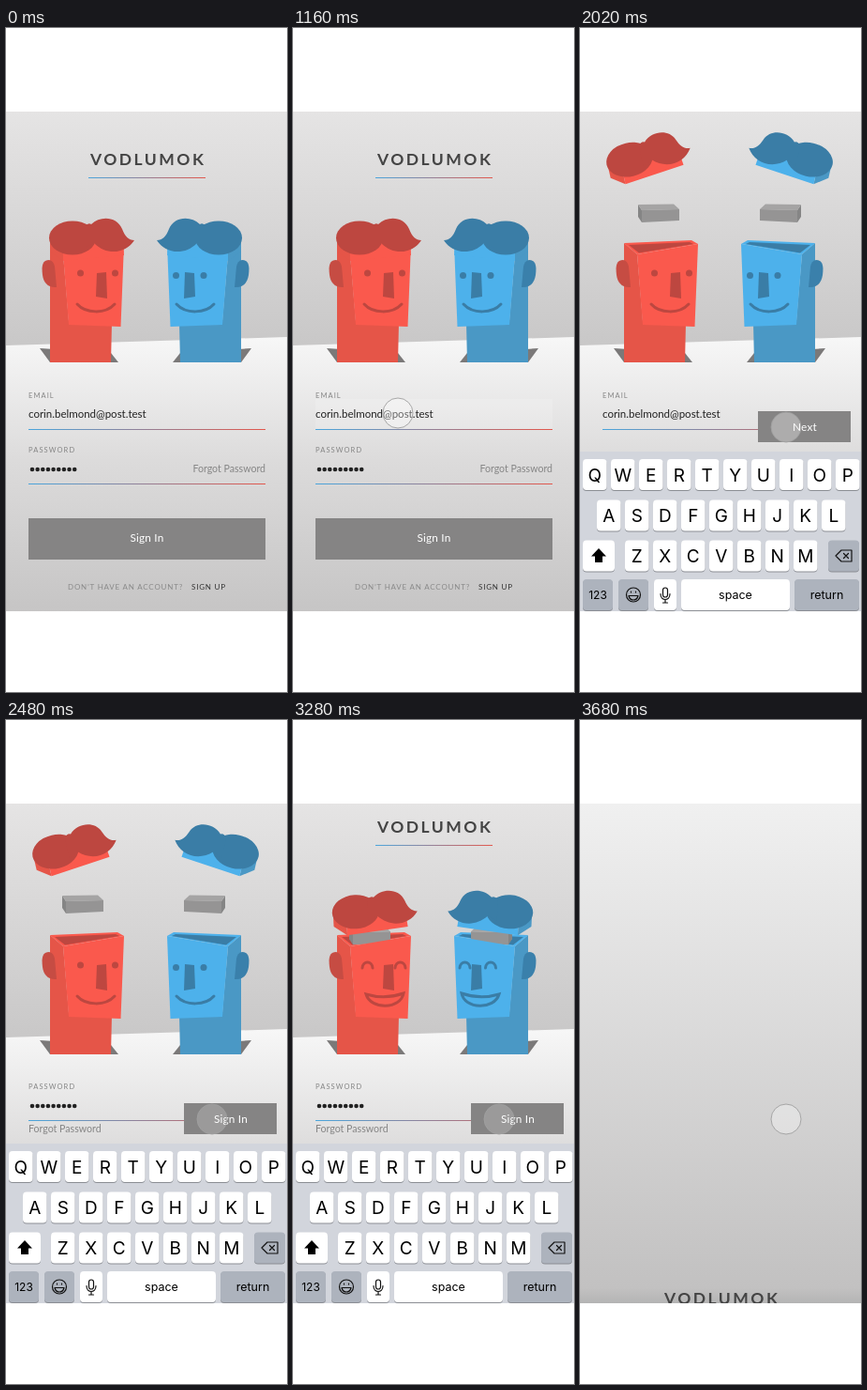
Animation of 300x707 px, one loop 3.7 s. Source, as an HTML page:

```html
<!DOCTYPE html>
<html lang="en">
<head>
<meta charset="utf-8">
<style>
html, body { margin: 0; width: 100%; height: 100%; overflow: hidden; background: #fff; }
svg { display: block; width: 300px; height: 707px; font-family: Lato, sans-serif; }
.label { font-size: 7.5px; letter-spacing: 1.1px; fill: #858585; }
.small { font-size: 8px; letter-spacing: .8px; fill: #8a8a8a; }
.forgot { font-size: 10.6px; fill: #858585; }
.button { font-size: 11.8px; letter-spacing: .2px; fill: #fff; text-anchor: middle; }
.title { font-size: 17.5px; font-weight: 700; letter-spacing: 2.5px; fill: #444; text-anchor: middle; }
#keys { font-family: Inter, sans-serif; text-anchor: middle; }
</style>
</head>
<body>
<svg viewBox="0 0 300 707">
  <defs>
    <linearGradient id="wall" gradientUnits="userSpaceOnUse" x1="0" y1="89" x2="0" y2="335">
      <stop stop-color="#e5e4e4"/><stop offset="1" stop-color="#c9c8c8"/>
    </linearGradient>
    <linearGradient id="sky" x2="0" y2="1">
      <stop stop-color="#f0f0f0"/><stop offset=".97" stop-color="#c2c1c1"/><stop offset="1" stop-color="#b4b4b4"/>
    </linearGradient>
    <linearGradient id="floor" x2="0" y2="1">
      <stop stop-color="#f7f7f7"/><stop offset=".45" stop-color="#dcdbdb"/><stop offset="1" stop-color="#c6c5c5"/>
    </linearGradient>
    <linearGradient id="rule"><stop stop-color="#4aa5dc"/><stop offset="1" stop-color="#e2574c"/></linearGradient>
  </defs>
  <path d="M0 89H300V621H0Z" fill="url(#wall)"/>
  <path id="blank" d="M0 89H300V621H0Z" fill="url(#sky)"/>
  <g id="scene">
    <path d="M0 338L300 329V621H0Z" fill="url(#floor)"/>
    <g id="heads"></g>
    <g id="title">
      <text class="title" x="151.7" y="146">VODLUMOK</text>
      <rect x="88" y="159" width="125" height="1" fill="url(#rule)"/>
    </g>
    <g id="email">
      <rect id="glow" x="24" y="395" width="253" height="32" fill="#fff"/>
      <text class="label" x="24" y="394">EMAIL</text>
      <text x="24" y="415" font-size="11.5" fill="#222">corin.belmond@post.test</text>
      <rect x="24" y="427" width="253" height="1" fill="url(#rule)"/>
    </g>
    <g id="password">
      <text class="label" x="24" y="452">PASSWORD</text>
      <g id="dots" fill="#222"></g>
      <rect x="24" y="485" width="253" height="1" fill="url(#rule)"/>
    </g>
    <g id="signin">
      <text class="forgot" x="277" y="473" text-anchor="end">Forgot Password</text>
      <path d="M24 522H277V566H24Z" fill="#858484"/>
      <text class="button" x="150.5" y="547">Sign In</text>
      <text class="small" x="66" y="598">DON’T HAVE AN ACCOUNT?</text>
      <text class="small" x="198" y="598" style="fill:#333">SIGN UP</text>
    </g>
    <text id="forgot" class="forgot" x="24" y="439">Forgot Password</text>
    <g id="action">
      <path d="M190 408H289V441H190Z" fill="#858484"/>
      <text id="next" class="button" x="240" y="429">Next</text>
      <text id="submit" class="button" x="240" y="429">Sign In</text>
    </g>
    <g id="keys"></g>
  </g>
  <path d="M0 0H300V89H0ZM0 621H300V707H0Z" fill="#fff"/>
  <circle id="touch" r="16" fill="#fff" stroke="#a0a0a0" stroke-opacity=".9"/>
</svg>
<script>
const $ = id => document.getElementById(id);
const all = name => document.querySelectorAll('.' + name);

// Heads: the right one mirrors the left one.
function head(front, side, dark, ear, eye, eyeY, mirror) {
  const poly = (points, fill) => `<polygon points="${points}" fill="${fill}"/>`;
  const line = d => `<path d="${d}" fill="none" stroke="${dark}" stroke-width="3" stroke-linecap="round"/>`;
  const arc = x => line(`M${x - 5.5} 264C${x - 5} 256 ${x + 5} 256 ${x + 5.5} 264`);
  return `<g ${mirror ? 'transform="translate(298) scale(-1 1)"' : ''}>
    ${poly('36,341 112,346 120,356 47,356', '#7b7979')}
    ${poly('47,229 61,241 67,312 113,314 112,356 47,356', side)}
    ${poly('47,229 119,226 126,230 61,241', front)}
    ${poly('52,231 117,228 121,230 63,239.5', dark)}
    <g class="block" data-side="${mirror ? -1 : 1}">
      ${poly('62,188 66,194 66,207 62,201', '#858585')}
      ${poly('62,188 100,187.5 106,193 66,194', '#a5a4a4')}
      ${poly('66,194 106,193 106,205 66,207', '#959494')}
    </g>
    ${poly('61,241 126,230 122.5,318 67,316', front)}
    ${poly('97,261 107,260 108,288 96,286', dark)}
    <g class="calm">
      <circle cx="${eye}" cy="${eyeY}" r="3.5" fill="${dark}"/>
      <circle cx="116.5" cy="${eyeY}" r="3.5" fill="${dark}"/>
      ${line('M76 294C85 304 106 305 116 294')}
    </g>
    <g class="happy">
      ${arc(eye)}${arc(114.5)}
      ${line('M78 292Q98 298 118 291C115 308 83 309 78 292Z')}
    </g>
    <path d="M46 247C38 247 38 255 39 263S45 277 54 276L52 254Q51 248 46 247" fill="${ear}"/>
    <g class="lid">
      ${poly('47,222 61,226 61,248 47,238', side)}
      ${poly('61,226 124,224 126,242 61,248', front)}
      <ellipse cx="71" cy="223.5" rx="25" ry="18" fill="${dark}"/>
      <path d="M84 211Q88 207 91 209C101 199 119 201 124 214C127 222 131 226 137 226C128 240 108 243 94 229L84 234Z" fill="${dark}"/>
    </g>
  </g>`;
}
$('heads').innerHTML =
  head('#fa594d', '#e55548', '#bd4740', '#c64c43', 79.5, 261, false) +
  head('#4db1eb', '#4a98c5', '#3a7da6', '#3a80ab', 87, 263.5, true);

for (let i = 0; i < 9; i++)
  $('dots').innerHTML += `<circle cx="${28 + i * 5.65}" cy="470" r="2.3"/>`;

// Keyboard
function key(x, y, width, text = '', fill = '#fff', size = 19) {
  const box = (dy, color) => `<rect x="${x}" y="${y + dy}" width="${width}" height="33" rx="4" fill="${color}"/>`;
  return box(1, '#8b8e94') + box(0, fill) +
    `<text x="${x + width / 2}" y="${y + 16.5 + size * .39}" font-size="${size}">${text}</text>`;
}
const row = (letters, x, y) => [...letters].map((c, i) => key(x + i * 30, y, 25.5, c)).join('');
const grey = '#adb3bd';
$('keys').innerHTML = '<path d="M0 451H300V640H0Z" fill="#d2d5dc"/>' +
  row('QWERTYUIOP', 3, 459) + row('ASDFGHJKL', 18, 502.5) + row('ZXCVBNM', 48, 545.5) +
  key(3, 545.5, 34) + key(265, 545.5, 33, '', grey) +
  key(3, 587, 32, '123', grey, 12) + key(41, 587, 32, '', grey) + key(79, 587, 24) +
  key(108, 587, 116, 'space', '#fff', 12.5) + key(229, 587, 69, 'return', grey, 12.5) +
  `<path d="M20 554L28 562.5H24V569H16V562.5H12Z"/>
  <g fill="none" stroke="#111" stroke-width="1.2" stroke-linecap="round" stroke-linejoin="round">
    <path d="M273 562L279 556H290V568H279ZM281.5 559.5L286.5 564.5M286.5 559.5L281.5 564.5"/>
    <circle cx="57" cy="603.5" r="7.5"/>
    <path d="M52 604.5H62Q61 609 57 609T52 604.5M54.5 600V601M59.5 600V601"/>
    <rect x="88.5" y="596" width="5" height="10" rx="2.5"/>
    <path d="M86 602.5C86 610.5 96 610.5 96 602.5M91 608.5V612M88.5 612H93.5"/>
  </g>`;

// Timing
const span = (t, from, to) => Math.min(1, Math.max(0, (t - from) / (to - from)));
const inOut = u => u < .5 ? 4 * u ** 3 : 1 - 4 * (1 - u) ** 3;
const ease = (t, from, to) => inOut(span(t, from, to));
const spring = ms => ms < 0 ? 0 : 1 - Math.exp(-.0086 * ms) * Math.cos(.0135 * ms);
const within = (t, from, to) => t >= from && t < to;
const move = (el, x, y, extra = '') => el.setAttribute('transform', `translate(${x} ${y}) ${extra}`);
const fade = (id, value) => $(id).setAttribute('opacity', value);

function draw(t) {
  const open = spring(t - 1200) * (1 - ease(t, 3195, 3335));
  const sway = ease(t, 2200, 2450);
  const slide = ease(t, 3360, 3700);
  all('lid').forEach(el => move(el, -16 * open, -87 * open, `rotate(${-13 * open} 86 235)`));
  all('block').forEach(el => move(el, -2 * sway * el.dataset.side, 43 * (1 - open) - sway));
  const happy = t >= 3180;
  all('calm').forEach(el => el.setAttribute('opacity', happy ? 0 : 1));
  all('happy').forEach(el => el.setAttribute('opacity', happy ? 1 : 0));

  const away = ease(t, 1200, 1400) * (1 - ease(t, 3213, 3333));
  move($('title'), 0, -80 * away);
  move($('keys'), 0, 170 * (1 - span(t, 1200, 1575)) ** 3);

  const leave = 1 - span(t, 1200, 1330);
  const swap = span(t, 2090, 2270);
  fade('glow', .15 * span(t, 1120, 1160) * (1 - span(t, 1400, 1600)));
  fade('signin', leave);
  fade('email', 1 - swap);
  fade('password', t < 1400 ? leave : swap);
  move($('password'), 0, t < 1400 ? 0 : -59);
  fade('forgot', swap);
  fade('action', span(t, 1480, 1640));
  fade('next', 1 - swap);
  fade('submit', swap);

  move($('scene'), 0, 476 * slide);
  fade('blank', slide);

  const enter = ease(t, 760, 1080), cross = ease(t, 1560, 1950);
  move($('touch'), 318 - 206 * enter + 108 * cross, 470 - 60 * enter + 15 * cross);
  const pressed = within(t, 1130, 1210) || within(t, 1990, 2090) || within(t, 3130, 3200) || t > 3360;
  $('touch').setAttribute('fill-opacity', pressed ? .33 : .18);
}

function tick() {
  draw(performance.now() % 3700);
  requestAnimationFrame(tick);
}
tick();
</script>
</body>
</html>
```
